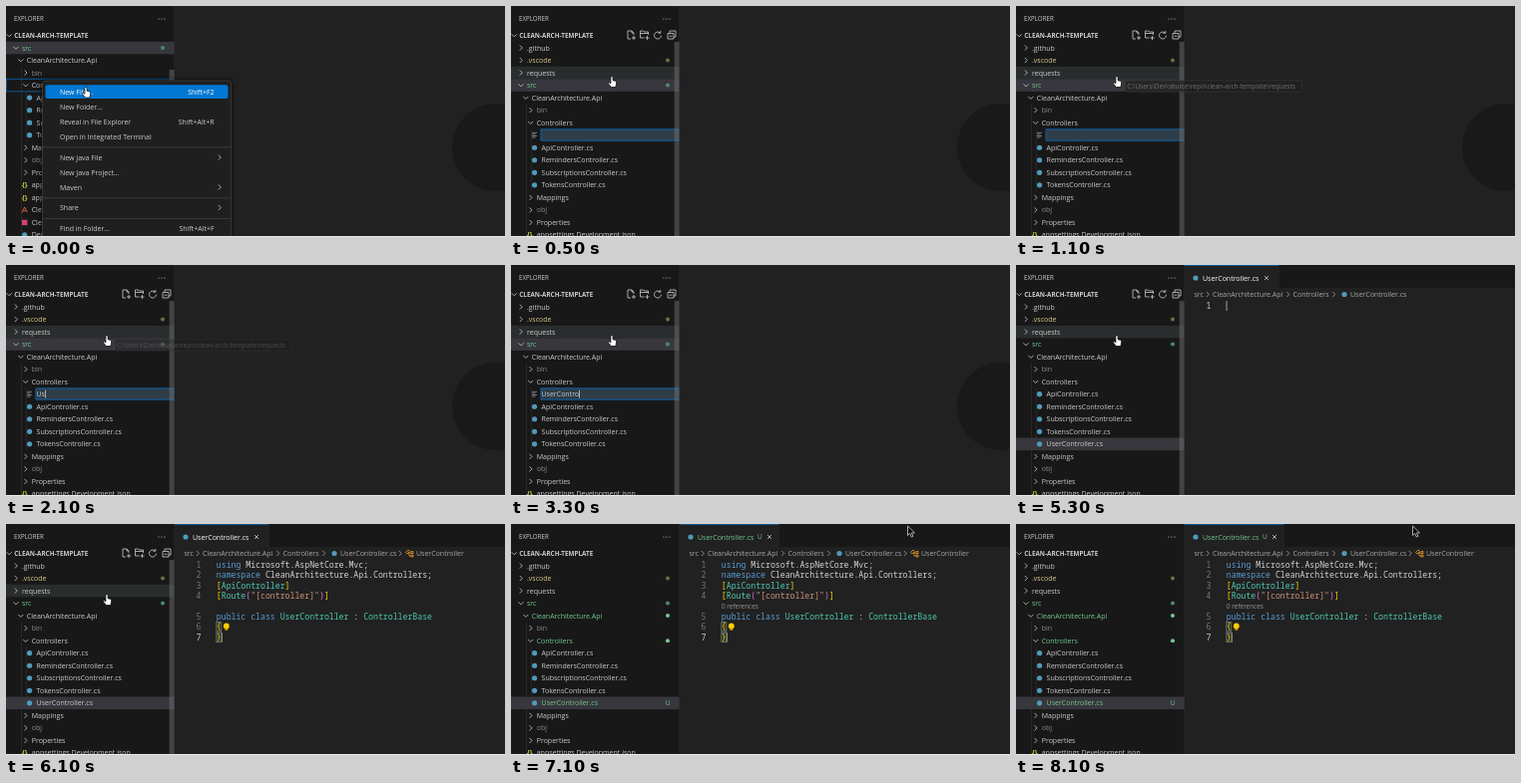
Write an HTML page with a canvas that moves like this. It is 500 px wide and 232 px high and loops after 8.17 s.

```html
<!DOCTYPE html>
<html lang="en">
<head>
<meta charset="utf-8">
<title>New controller file</title>
<style>
html, body { margin: 0; width: 100%; height: 100%; overflow: hidden; background: #212121; }
canvas { display: block; width: 100vw; height: 100vh; }
</style>
</head>
<body>
<canvas id="stage" width="500" height="232"></canvas>
<script>
const ctx = document.getElementById('stage').getContext('2d');
const LOOP = 8170, SIDE = 169, ROW = 12.53;
const UI = '"Open Sans", "Noto Sans", sans-serif';
const MONO = '8.2px "Noto Sans Mono", "DejaVu Sans Mono", monospace';
const GREEN = '#73c991', BLUE = '#519aba', GREY = '#cccccc', DIM = '#8c8c8c', ACCENT = '#0078d4';

// When each part of the story happens, in ms
const AT = { menuClosed: 200, input: 300, caret: 1500, submit: 5000, editor: 5100,
             code: 5600, symbol: 5900, lens: 6300, untracked: 6500, leave: 6600 };
const FILE = 'UserController.cs';
const KEYS = [1900, 2100, 2300, 2500, 2700, 2800, 2900, 3000, 3100, 3300,
              3800, 3900, 4000, 4200, 4500, 4600, 4700];

const clamp = v => Math.max(0, Math.min(1, v));
const ease = v => { v = clamp(v); return v * v * (3 - 2 * v); };
const mix = (a, b, v) => a + (b - a) * v;

function rect(x, y, w, h, fill) {
  ctx.fillStyle = fill;
  ctx.fillRect(x, y, w, h);
}
function box(x, y, w, h, r, fill, stroke) {
  ctx.beginPath();
  ctx.roundRect(x, y, w, h, r);
  if (fill) { ctx.fillStyle = fill; ctx.fill(); }
  if (stroke) { ctx.strokeStyle = stroke; ctx.lineWidth = 0.7; ctx.stroke(); }
}
function dot(x, y, r, fill) {
  ctx.beginPath();
  ctx.arc(x, y, r, 0, Math.PI * 2);
  ctx.fillStyle = fill;
  ctx.fill();
}
function line(d, color, x = 0, y = 0, width = 0.8) {
  ctx.save();
  ctx.translate(x, y);
  ctx.strokeStyle = color;
  ctx.lineWidth = width;
  ctx.stroke(new Path2D(d));
  ctx.restore();
}
// y is the vertical centre of the capitals
function text(s, x, y, color = GREY, size = 7, weight = 400, align = 'left') {
  ctx.font = `${weight} ${size}px ${UI}`;
  ctx.textAlign = align;
  ctx.fillStyle = color;
  ctx.fillText(s, x, y + size * 0.36);
}
const chevron = (x, y, open, color = GREY) =>
  line(open ? 'M-2.5-1.2 0 1.3 2.5-1.2' : 'M-1.2-2.5 1.3 0-1.2 2.5', color, x, y);
const cross = (x, y) => line('M-2-2 2 2M2-2-2 2', GREY, x, y);

function fileIcon(kind, x, y) {
  if (kind === 'cs') dot(x, y, 2.6, BLUE);
  if (kind === 'json') text('{}', x, y, '#cbcb41', 7, 700, 'center');
  if (kind === 'http') line('M-2.5 2.5 0-3 2.5 2.5M-1.5.8H1.5', '#cc5a3e', x, y, 1);
  if (kind === 'proj') rect(x - 2.7, y - 2.7, 5.4, 5.4, '#d6416e');
  if (kind === 'text') line('M-2.5-2.4H2.5M-2.5-.8H1M-2.5.8H2.5M-2.5 2.4H1', '#a0a0a0', x, y, 0.7);
}

function treeRows(t) {
  const open = (name, depth, extra) => ({ name, depth, folder: 'open', ...extra });
  const shut = (name, depth, extra) => ({ name, depth, folder: 'shut', ...extra });
  const file = (name, depth, kind, extra) => ({ name, depth, kind, ...extra });
  const created = t >= AT.submit, fresh = t >= AT.untracked;
  const changed = fresh ? { color: GREEN, dot: GREEN } : {};
  const controllers = ['Api', 'Reminders', 'Subscriptions', 'Tokens']
    .map(name => file(name + 'Controller.cs', 3, 'cs'));
  if (created)
    controllers.push(file(FILE, 3, 'cs', { selected: true, color: fresh ? GREEN : GREY, badge: fresh && 'U' }));
  else if (t >= AT.input)
    controllers.unshift(file('', 3, t >= KEYS.at(-1) ? 'cs' : 'text', { input: true }));

  return [
    shut('.github', 0),
    shut('.vscode', 0, { color: '#d8c98c', dot: '#756b46' }),
    shut('requests', 0, { hover: t >= 500 && t < AT.leave }),
    open('src', 0, { color: GREEN, dot: '#4f8a66', selected: !created }),
    open('CleanArchitecture.Api', 1, changed),
    shut('bin', 2, { color: DIM }),
    open('Controllers', 2, { ...changed, outlined: t < AT.input }),
    ...controllers,
    shut('Mappings', 2), shut('obj', 2, { color: DIM }), shut('Properties', 2),
    file('appsettings.Development.json', 2, 'json'), file('appsettings.json', 2, 'json'),
    file('CleanArchitecture.Api.http', 2, 'http'), file('CleanArchitecture.Api.csproj', 2, 'proj'),
    file('DependencyInjection.cs', 2, 'cs')
  ];
}

function drawInput(t, y) {
  box(29.9, y - 5.9, SIDE - 30.3, 11.4, 0, '#2f3d49', ACCENT);
  const typed = FILE.slice(0, KEYS.filter(k => t >= k).length);
  text(typed, 30.5, y);
  if (t >= AT.caret) rect(30.6 + ctx.measureText(typed).width, y - 4, 0.7, 8, '#dddddd');
}

function drawSidebar(t) {
  rect(0, 0, SIDE, 232, '#181818');
  ctx.save();
  ctx.beginPath();
  ctx.rect(0, 35.5, SIDE, 200);
  ctx.clip();
  const scrolled = t < AT.input;
  const top = scrolled ? 42 - 3 * ROW : 42;
  treeRows(t).forEach((row, i) => {
    const y = top + i * ROW, x = 16 + row.depth * 4.85;
    if (row.selected || row.hover)
      rect(0, y - ROW / 2, SIDE, ROW, row.selected ? '#37373d' : '#2a2d2e');
    if (row.outlined) box(0.4, y - ROW / 2, SIDE - 0.8, ROW, 0, null, ACCENT);
    for (let level = 2; level <= row.depth; level++)
      rect(5.4 + level * 4.85, y - ROW / 2, 0.5, ROW, '#3a3a3a');
    if (row.folder) chevron(x - 6, y, row.folder === 'open');
    else fileIcon(row.kind, x - 7, y);
    if (row.input) drawInput(t, y);
    else text(row.name, x, y, row.color);
    if (row.dot) dot(157, y, 2, row.dot);
    if (row.badge) text(row.badge, 157, y, GREEN, 6.5, 400, 'center');
  });
  ctx.restore();
  if (t < AT.leave) rect(163.7, scrolled ? 64 : 36, 5.3, 200, 'rgba(121, 121, 121, 0.45)');

  text('EXPLORER', 8, 13, GREY, 6.2);
  [153, 156, 159].forEach(x => dot(x, 13, 0.6, GREY));
  chevron(3.2, 29.5, true);
  text('CLEAN-ARCH-TEMPLATE', 8.3, 29.5, GREY, 6.35, 700);
  if (t >= AT.input && t < AT.leave) drawActions();
  rect(SIDE - 0.5, 0, 0.5, 232, '#2b2b2b');
}

function drawActions() {
  line('M0 4H-3V-4H1L3-2V0M1-4V-2H3M1 3H5M3 1V5', GREY, 120, 29);
  line('M0 3H-4V-4H-1L0-3H4V0M-4-1.5H4M1 3H5M3 1V5', GREY, 133.5, 29);
  line('M2.3-2.6A3.5 3.5 0 1 0 3.5.2M2.8-4.6V-2.3H.4', GREY, 147, 29.5);
  line('M-4-1.5H2V4H-4ZM-2-1.5V-4H4V2H2M-2.5 1.2H.5', GREY, 161, 29);
}

function drawMenu() {
  ctx.save();
  ctx.shadowColor = '#000';
  ctx.shadowBlur = 5;
  box(36.5, 75, 189, 175, 3, '#1f1f1f');
  ctx.restore();
  box(36.5, 75, 189, 175, 3, null, '#454545');
  box(39.5, 79.3, 183, 13.6, 2, ACCENT);
  const items = [
    ['New File...', 86, 'Shift+F2'], ['New Folder...', 101], ['Reveal in File Explorer', 116, 'Shift+Alt+R'],
    ['Open in Integrated Terminal', 131], ['New Java File', 152, '>'], ['New Java Project...', 167],
    ['Maven', 182, '>'], ['Share', 202.5, '>'], ['Find in Folder...', 223.7, 'Shift+Alt+F']
  ];
  items.forEach(([label, y, hint], i) => {
    const color = i ? GREY : '#ffffff';
    text(label, 54, y, color);
    if (hint === '>') chevron(214, y, false);
    else if (hint) text(hint, 208.5, y, color, 7, 400, 'right');
  });
  [141.5, 192.5, 213].forEach(y => rect(37, y, 188, 0.7, '#454545'));
}

const KEYWORD = '#569cd6', TYPE = '#4ec9b0', PLAIN = '#d4d4d4', GOLD = '#ffd700', STRING = '#ce9178', PINK = '#da70d6';
const CODE = [
  [41, ['using ', KEYWORD], ['Microsoft.AspNetCore.Mvc;', PLAIN]],
  [51.4, ['namespace ', KEYWORD], ['CleanArchitecture.Api.Controllers;', PLAIN]],
  [61.8, ['[', GOLD], ['ApiController', TYPE], [']', GOLD]],
  [72.2, ['[', GOLD], ['Route', TYPE], ['(', PINK], ['"[controller]"', STRING], [')', PINK], [']', GOLD]],
  [92.7, ['public class ', KEYWORD], ['UserController', TYPE], [' : ', PLAIN], ['ControllerBase', TYPE]],
  [103.3, ['{', GOLD]],
  [113.8, ['}', GOLD]]
];

function drawCode(t) {
  const lines = t >= AT.code ? CODE : [[41]];
  if (t >= AT.code) [103.3, 113.8].forEach(y => box(210.8, y - 4.8, 5, 9.6, 0, '#2b3426', '#888888'));
  lines.forEach(([y, ...parts], i) => {
    ctx.font = MONO;
    ctx.textAlign = 'right';
    ctx.fillStyle = i === lines.length - 1 ? GREY : '#6e7681';
    ctx.fillText(i + 1, 195.5, y + 2.9);
    ctx.textAlign = 'left';
    let x = 210.8;
    for (const [s, color] of parts) {
      ctx.fillStyle = color;
      ctx.fillText(s, x, y + 2.9);
      x += ctx.measureText(s).width;
    }
  });
  if (t < AT.code) rect(210.6, 36, 0.9, 10, '#aeafad');
  else {
    rect(216, 109, 0.7, 9.6, '#aeafad');
    dot(220.8, 102.5, 2.9, '#ffcc00');
    rect(219.4, 104.8, 2.8, 2, '#c99f00');
  }
  if (t >= AT.lens) text('0 references', 211, 82.7, '#999999', 6.4);
}

function drawEditor(t) {
  if (t < AT.editor) {
    dot(491, 142, 44, '#191919');
    return;
  }
  const fresh = t >= AT.untracked, tabEnd = fresh ? 268 : 263;
  rect(SIDE, 0, 331, 24, '#181818');
  rect(SIDE, 23.5, 331, 0.5, '#2b2b2b');
  rect(SIDE, 0, tabEnd - SIDE, 24, '#212121');
  rect(SIDE, 0, tabEnd - SIDE, 0.6, ACCENT);
  rect(tabEnd, 0, 0.5, 24, '#2b2b2b');
  dot(180, 13, 2.6, BLUE);
  text(FILE, 187, 13, fresh ? GREEN : '#ffffff');
  if (fresh) text('U', 247, 13, GREEN, 6.5);
  cross(fresh ? 259 : 251, 13);

  const crumb = '#a9a9a9';
  [['src', 178.5], ['CleanArchitecture.Api', 197], ['Controllers', 277.5], [FILE, 335]]
    .forEach(([s, x]) => text(s, x, 29.5, crumb));
  [192, 272.5, 318.5].forEach(x => chevron(x, 29.5, false, crumb));
  dot(329, 29.5, 2.6, BLUE);
  if (t >= AT.symbol) {
    chevron(395, 29.5, false, crumb);
    line('M-3.5-1 -1-3.5 .5-2 -2 .5ZM-1-.5H2M0-.5V2.5H2M2-2H4V0H2ZM2 1.5H4V3.5H2Z', '#ee9d28', 404, 29.5);
    text('UserController', 411, 29.5, crumb);
  }
  drawCode(t);
}

function drawTooltip(t) {
  const alpha = clamp((t - 800) / 400) * (1 - clamp((t - 1800) / 500));
  if (!alpha) return;
  ctx.globalAlpha = alpha;
  box(109.5, 74.8, 177, 11.4, 1.5, '#202020', '#3c3c3c');
  text('C:\\Users\\Dev\\source\\repo\\clean-arch-template\\requests', 111.3, 80.2, '#8c8c8c', 6.45);
  ctx.globalAlpha = 1;
}

const HAND = new Path2D('M-1.2-5.5Q0-6.3.6-5.3V-1.8L3.4-1.1Q4.4-.7 4.2.5L3.4 5H-1.2L-4 1.4Q-4.2.2-3 .3L-1.6 1.4V-5Z');
const ARROW = new Path2D('M0 0V9.5L2.2 7.4 3.8 11 5.4 10.3 3.9 6.9H7Z');

function drawPointer(t) {
  const over = ease((t - 100) / 400), away = ease((t - 6500) / 500);
  const x = mix(mix(80.5, 101.5, over), 397.5, away);
  const y = mix(mix(87, 76.5, over), 2, away);
  const hand = x < SIDE;
  ctx.save();
  ctx.translate(x, y);
  ctx.fillStyle = hand ? '#ffffff' : '#0a0a0a';
  ctx.strokeStyle = hand ? '#111111' : '#d0d0d0';
  ctx.lineWidth = 0.8;
  ctx.fill(hand ? HAND : ARROW);
  ctx.stroke(hand ? HAND : ARROW);
  ctx.restore();
}

const start = performance.now();
function draw() {
  const t = Math.floor((performance.now() - start) % LOOP / 100) * 100;
  rect(0, 0, 500, 232, '#212121');
  drawEditor(t);
  drawSidebar(t);
  if (t < AT.menuClosed) drawMenu();
  drawTooltip(t);
  drawPointer(t);
  rect(0, 231, 500, 1, '#e8e8e8');
  requestAnimationFrame(draw);
}
draw();
</script>
</body>
</html>
```
